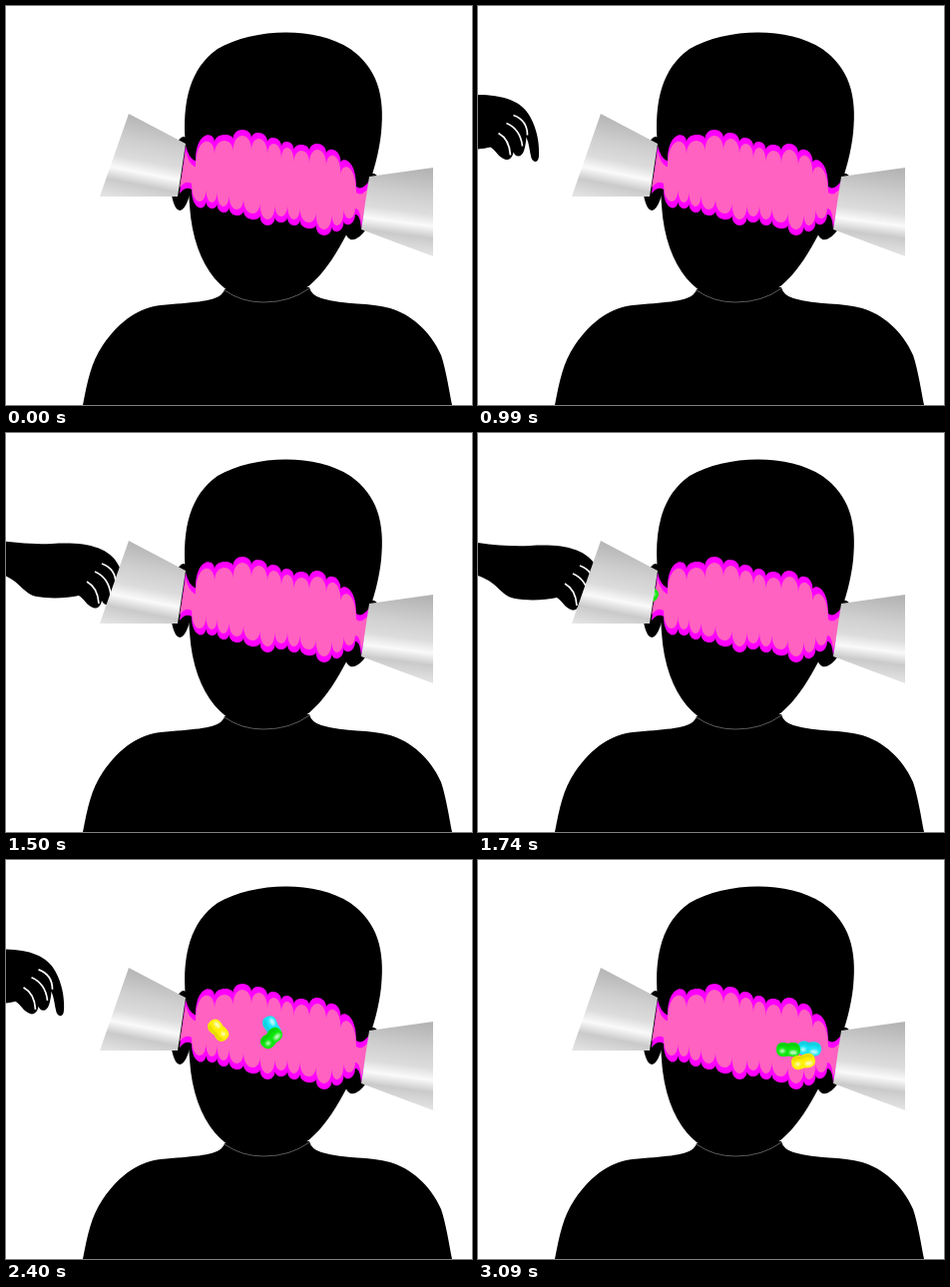
Write an HTML page that moves like this. It is 467 px wide and 400 px high and loops after 3600 ms.

```html
<!DOCTYPE html>
<html lang="en">
<head>
<meta charset="utf-8">
<title>Between the ears</title>
<style>
html, body { margin: 0; width: 100%; height: 100%; overflow: hidden; background: #fff; }
svg { display: block; width: 100%; height: 100%; }
</style>
</head>
<body>
<svg viewBox="0 0 467 400">
  <defs>
    <linearGradient id="metal" gradientUnits="userSpaceOnUse" x1="125" y1="108" x2="108" y2="194">
      <stop offset="0" stop-color="#b4b4b4"/>
      <stop offset=".3" stop-color="#cfcfcf"/>
      <stop offset=".5" stop-color="#dcdcdc"/>
      <stop offset=".64" stop-color="#fafafa"/>
      <stop offset=".78" stop-color="#cacaca"/>
      <stop offset="1" stop-color="#e6e6e6"/>
    </linearGradient>
    <linearGradient id="metalRight" href="#metal" x1="400" y1="162" x2="389" y2="247"/>
    <filter id="soft" x="-50%" y="-50%" width="200%" height="200%"><feGaussianBlur stdDeviation=".9"/></filter>
    <g id="bean">
      <path d="M-12 0C-12-8-5-8 0-6.5C6-8 12-7 12 0C12 8 4 8 1 6C-4 8-12 8-12 0Z"/>
      <path d="M-10 3Q-5 7 0 4Q6 7 10 3" fill="none" stroke="#000" stroke-opacity=".16" stroke-width="2" filter="url(#soft)"/>
      <g fill="#fff" fill-opacity=".8" filter="url(#soft)">
        <ellipse cx="-5" cy="-3" rx="4" ry="2"/>
        <ellipse cx="6" cy="-1.5" rx="2.6" ry="2"/>
      </g>
    </g>
  </defs>

  <g id="hand">
    <path d="M-140 86C-100 90-60 93-37 96Q-10 100 15 99C46 97 72 101 82 121C90 136 91 150 90.5 160C90 167 85 167 83 162C81 155 81 148 78 141C77 152 75 160 70 160C67 160 66 158 65 156C64 162 60 165 56 163C50 161 48 155 42 151C30 154 10 154 0 152C-15 149-15 137-37 129Q-80 120-140 118Z"/>
    <path d="M65 119Q79 124 79 139M58 127Q72 133 74 150M50 137Q61 143 62 159" fill="none" stroke="#fff" stroke-width="1.7"/>
  </g>

  <ellipse cx="176" cy="168" rx="11" ry="37" transform="rotate(3 176 168)"/>
  <ellipse cx="357" cy="201" rx="14" ry="35" transform="rotate(20 357 201)"/>
  <path d="M77 400C82 375 85 358 97 340C115 314 135 302 155 300C185 297 207 297 216 289Q219 286 219 284L304 282Q306 290 316 293C340 300 365 297 385 303C405 309 425 325 436 350C441 365 444 385 447 400Z"/>
  <path d="M180 140C176 95 185 62 212 43C248 22 310 20 345 43C372 62 380 90 376 127C372 165 355 205 338 235C318 272 295 297 258 297C222 297 188 265 184 200Z"/>
  <path d="M219 285Q236 297 258 297Q285 297 304 283" fill="none" stroke="#999" stroke-width=".6"/>

  <path id="rim" fill="#ff00ff"/>
  <path id="core" fill="#ff62c0"/>

  <use id="cyan" href="#bean" fill="#14e4f6"/>
  <use id="green" href="#bean" fill="#0be60b"/>
  <use id="yellow" href="#bean" fill="#fff000"/>

  <path d="M123 108L180 138L172 191L94 191Z" fill="url(#metal)"/>
  <path d="M364 171L428 162V251L356 224Z" fill="url(#metalRight)"/>
</svg>
<script>
const $ = id => document.getElementById(id);

// Peaks of the ruffled edge, left to right
const upper = [[201,130],[217,129],[238,124],[254,127],[270,132],[282,136],[295,139],[313,138],[329,144],[342,156]];
const lower = [[195,202],[206,203],[217,207],[230,210],[246,214],[263,220],[276,217],[288,220],[301,223],[320,230],[333,226],[344,219]];

// Rounded humps through the peaks, with sharp notches between them
function ruffle(peaks, first, last, inset, depth, reverse) {
  const notches = [first];
  for (let i = 1; i < peaks.length; i++) {
    const [a, b] = [peaks[i - 1], peaks[i]];
    notches.push([(a[0] + b[0]) / 2, (a[1] + b[1]) / 2 + depth]);
  }
  notches.push(last);
  let tops = peaks.map(p => p[1] + inset);
  if (reverse) { notches.reverse(); tops.reverse(); }
  let d = "L" + notches[0];
  tops.forEach((y, i) => {
    const [a, b] = [notches[i], notches[i + 1]];
    const mid = (a[1] + b[1]) / 2, lift = (y - mid) * 4 / 3;
    d += `C${a[0]} ${mid + lift} ${b[0]} ${mid + lift} ${b}`;
  });
  return d;
}

function blob(inset, depth) {
  const e = inset;
  return `M180 ${140 + e}Q183 ${152 + e} 189 ${155 + e}` +
    ruffle(upper, [190, 155 + e], [351, 181 + e], e, depth, false) +
    `Q357 ${186 + e} 365 ${174 + e}L356 ${224 - e}Q355 ${209 - e} 350 ${209 - e}` +
    ruffle(lower, [186, 184 - e], [350, 208 - e], -e, -depth, true) +
    `Q180 ${180 - e} 174 ${188 - e}Z`;
}
$("rim").setAttribute("d", blob(0, 7));
$("core").setAttribute("d", blob(6, 19));

// Keys: time, x, y, angle
const tracks = {
  hand: [[480,-93,-30,0],[750,-59,-19,0],[1230,0,0,0],[1500,31,12,0],[1590,37,14,0],[2100,37,14,0],[2670,-95,-30,0]],
  green: [[1700,164,158,30],[2100,221,167,92],[2700,311,190,180]],
  cyan: [[1830,164,155,-50],[2100,213,156,3],[2700,320,180,122],[2820,332,189,185]],
  yellow: [[2110,164,160,0],[2700,263,182,98],[3090,326,202,168]]
};

function pose(keys, t) {
  const i = keys.findIndex(k => k[0] > t);
  if (i === 0) return keys[0].slice(1);
  if (i < 0) return keys[keys.length - 1].slice(1);
  const [a, b] = [keys[i - 1], keys[i]];
  const p = (t - a[0]) / (b[0] - a[0]);
  return a.map((v, j) => v + (b[j] - v) * p).slice(1);
}

function draw() {
  const t = Math.floor(performance.now() % 3600 / 30) * 30;
  for (const id in tracks) {
    const [x, y, angle] = pose(tracks[id], t);
    $(id).setAttribute("transform", `translate(${x} ${y}) rotate(${angle})`);
  }
  requestAnimationFrame(draw);
}
draw();
</script>
</body>
</html>
```
